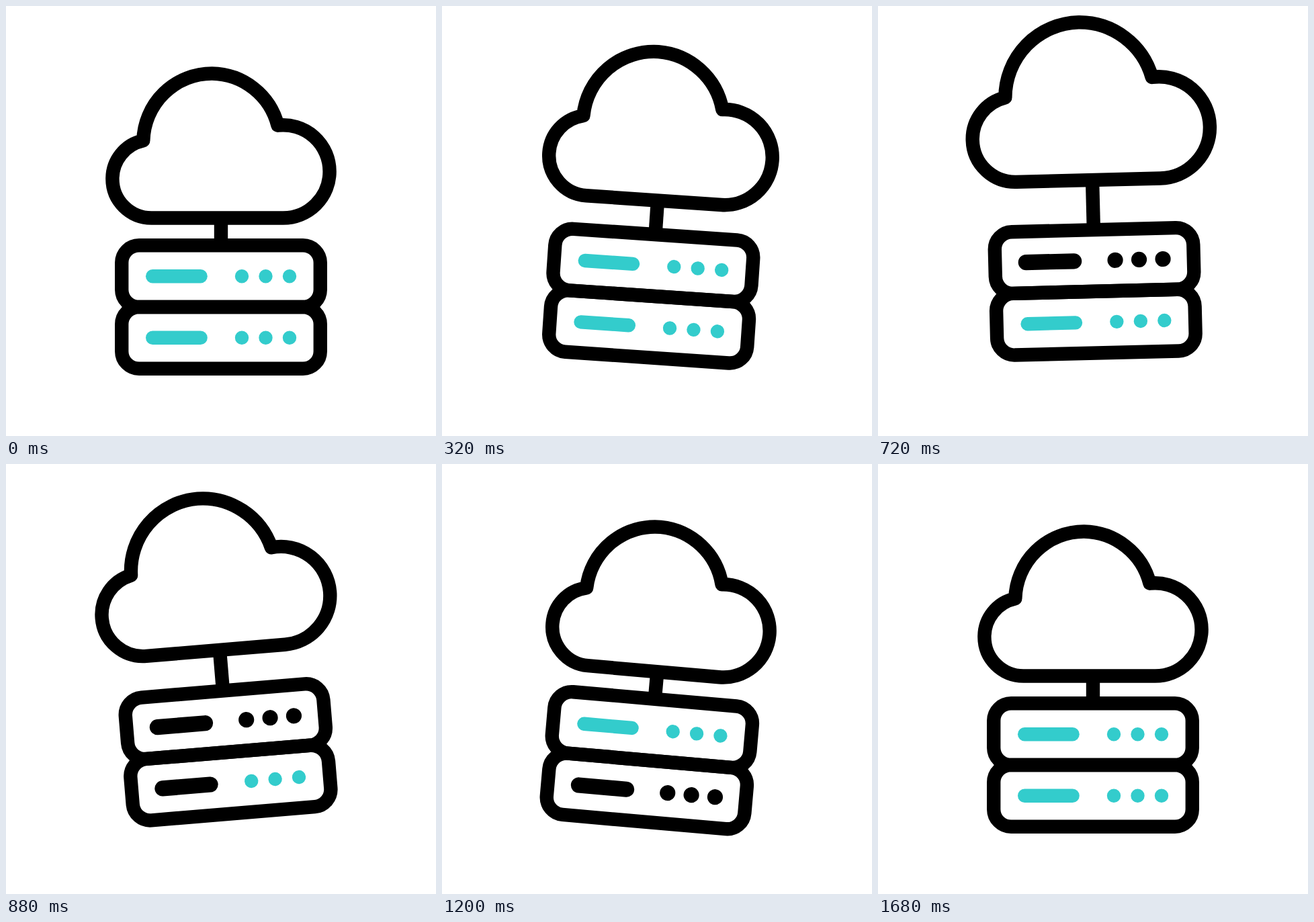
An HTML page for the animation above (1.84 s loop, 640 px wide and 640 px high).

```html
<!DOCTYPE html>
<html lang="en">
<head>
<meta charset="utf-8">
<title>Cloud server</title>
<style>
  html, body { margin: 0; width: 100%; height: 100%; overflow: hidden; background: #fff; }
  svg { display: block; width: 100vw; height: 100vh; }
</style>
</head>
<body>
<svg viewBox="0 0 640 640">
  <g id="icon" fill="none" stroke="#000" stroke-width="20.4" stroke-linejoin="round">
    <path id="cloud" d="M216.5 315.5H412.5A69.1 69.1 0 0 0 481.6 246.4A69.1 69.1 0 0 0 404.5 177.7
      A102.5 102.5 0 0 0 306.5 100.5A102.5 102.5 0 0 0 204.3 200.3
      A58.1 58.1 0 0 0 158.4 257.5A58.1 58.1 0 0 0 216.5 315.5Z"/>
    <path id="stem"/>
    <rect x="172.2" y="356.3" width="295.6" height="91.7" rx="25.8"/>
    <rect x="172.2" y="448" width="295.6" height="91.7" rx="25.8"/>
    <g id="lights" stroke-linecap="round"></g>
  </g>
</svg>
<script>
const LOOP = 1840, STEP = 40, TEAL = '#33cccc';
const $ = id => document.getElementById(id);

// Keyframes: [time, value], smoothly eased between neighbours
const TILT = [[40, 0], [440, 5], [520, 5], [855, -5], [1115, 5], [1220, 5], [1530, -2.5], [1560, -2.5], [1680, 0]];
const LIFT = [[40, 0], [500, 24.3], [600, 24.3], [1500, 0]];
const GROW = [[170, 0], [595, 1], [660, 1], [1150, 0]];

function at(keys, t) {
  if (t <= keys[0][0]) return keys[0][1];
  for (let i = 1; i < keys.length; i++) {
    const [t0, a] = keys[i - 1], [t1, b] = keys[i];
    if (t < t1) {
      const p = (t - t0) / (t1 - t0);
      return a + (b - a) * p * p * (3 - 2 * p);
    }
  }
  return keys[keys.length - 1][1];
}

// Zero-length round-capped strokes draw the dots
const BAR = y => `M218.2 ${y}H289.6`;
const DOTS = y => [351, 386.5, 422].map(x => `M${x} ${y}h.01`).join('');
const lights = [BAR(402.2), DOTS(402.2), BAR(493.8), DOTS(493.8)].map((d, i) => {
  const el = document.createElementNS('http://www.w3.org/2000/svg', 'path');
  el.setAttribute('d', d);
  $('lights').append(el);
  return { el, on: 400 + 240 * i, off: 920 + 240 * i };
});

function draw(t) {
  const grow = at(GROW, t), scale = 1 + 0.098 * grow, rise = 34.8 * grow;
  $('icon').setAttribute('transform', `translate(0 ${-at(LIFT, t)}) rotate(${at(TILT, t)} 320 320)`);
  $('cloud').setAttribute('transform',
    `translate(320 ${315.5 - rise}) scale(${scale}) translate(-320 -315.5)`);
  $('cloud').setAttribute('stroke-width', 20.4 / scale);
  $('stem').setAttribute('d', `M320 ${315.5 - rise}V356.3`);
  for (const { el, on, off } of lights) {
    const dark = t >= on && t < off;
    el.setAttribute('stroke', dark ? '#000' : TEAL);
    el.setAttribute('stroke-width', dark ? 23.2 : 20.4);
  }
}

const start = performance.now();
function tick() {
  const t = (performance.now() - start) % LOOP;
  draw(Math.floor(t / STEP) * STEP);
  requestAnimationFrame(tick);
}
draw(0);
requestAnimationFrame(tick);
</script>
</body>
</html>
```
